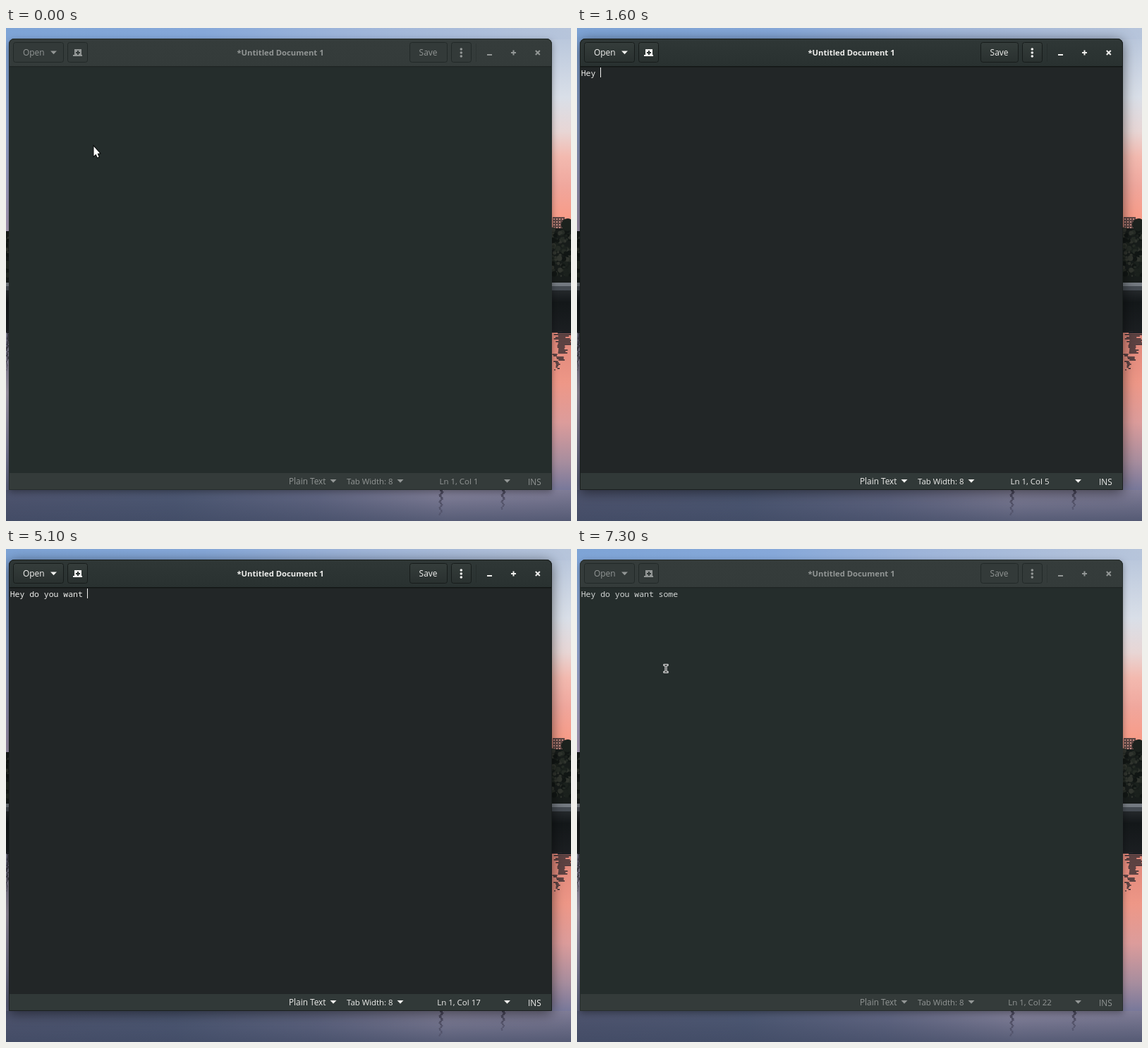
Animation of 801 by 699 pixels, one loop 8 s. Source, as an HTML page with a canvas:

```html
<!DOCTYPE html>
<html>
<head>
<meta charset="utf-8">
<style>
html, body { margin: 0; width: 100%; height: 100%; overflow: hidden; background: #222627; }
canvas { display: block; }
</style>
</head>
<body>
<canvas id="stage" width="801" height="699"></canvas>
<script>
const W = 801, H = 699, LOOP = 8000;
const ctx = document.getElementById('stage').getContext('2d');
const UI = '"Open Sans", "Noto Sans", sans-serif';
const MONO = '"Noto Sans Mono", "DejaVu Sans Mono", monospace';
const PHRASE = 'Hey do you want some ';
const KEY_TIMES = [1100, 1300, 1400, 1600, 1800, 2000, 2000, 2400, 2500, 2600, 2700,
  4200, 4600, 4700, 4900, 5100, 5300, 5500, 5600, 5800, 6000];
const CHAR = 6.87;

function mix(a, b, k) {
  const part = (hex, i) => parseInt(hex.substr(1 + 2 * i, 2), 16);
  return 'rgb(' + [0, 1, 2].map(i => Math.round(part(a, i) + (part(b, i) - part(a, i)) * k)) + ')';
}

function gradient(g, x0, y0, x1, y1, stops) {
  const fill = g.createLinearGradient(x0, y0, x1, y1);
  stops.forEach(([at, color]) => fill.addColorStop(at, color));
  return fill;
}

// Lake at dusk, visible only around the window
function paintWallpaper() {
  const canvas = document.createElement('canvas');
  canvas.width = W;
  canvas.height = H;
  const g = canvas.getContext('2d');
  let seed = 7;
  const rnd = () => (seed = seed * 16807 % 2147483647) / 2147483647;
  const rect = (color, x, y, w, h) => { g.fillStyle = color; g.fillRect(x, y, w, h); };

  rect(gradient(g, 0, 0, 0, H, [[0, '#7fa5d8'], [.2, '#94a9d6'], [.4, '#a99cb8'], [.53, '#c2c4cc'],
    [.64, '#77758a'], [.74, '#a29aac'], [.86, '#787995'], [1, '#414b66']]), 0, 0, 400, H);
  rect(gradient(g, 0, 0, 0, H, [[0, '#b4c3da'], [.14, '#d9dfe8'], [.21, '#e8d6d5'], [.26, '#f3bab0'],
    [.32, '#f0a79d'], [.38, '#f79c89'], [.62, '#dd8578'], [.72, '#ee9787'], [.8, '#dc9c9b'],
    [.88, '#a78d9e'], [.94, '#75779a'], [1, '#5b6684']]), 770, 0, 31, H);
  rect(gradient(g, 0, 0, W, 0, [[0, '#7ea4d6'], [.35, '#86a8d9'], [.6, '#9db4d9'], [1, '#b7c5db']]), 0, 0, W, 16);
  rect(gradient(g, 0, 0, W, 0, [[0, '#4e546e'], [.3, '#4d5873'], [.55, '#626783'],
    [.78, '#85829b'], [1, '#7f7c96']]), 0, 655, W, 44);
  rect(gradient(g, 0, 655, 0, H, [[0, 'rgba(62,72,98,0)'], [1, 'rgba(62,72,98,.65)']]), 0, 655, W, 44);

  rect('#5e4644', 775, 268, 17, 20);
  for (let y = 270; y < 286; y += 4)
    for (let x = 776; x < 791; x += 4) rect('#c08a80', x, y, 2, 2);
  for (const [x, w, top] of [[0, 5, 288], [774, 27, 284]]) {
    rect('#171c1a', x, top, w, 362 - top);
    for (let i = 0; i < w * 4; i++) {
      g.fillStyle = ['#1b211d', '#252b25', '#111614', '#30342e'][i % 4];
      g.beginPath();
      g.arc(x + rnd() * w, top + 2 + rnd() * 66, 1 + rnd() * 3, 0, 7);
      g.fill();
    }
    rect('#737980', x, 361, w, 5);
    rect('#454b52', x, 366, w, 6);
    rect(gradient(g, 0, 372, 0, 440, [[0, '#24282b'], [.25, '#131719'], [1, '#1d2023']]), x, 372, w, 60);
    for (let y = 430; y < 486; y += 2)
      rect('#24242a', x + rnd() * w * .4, y, w * (1 - (y - 430) / 60) * (.4 + rnd() * .7), 1.4);
  }
  g.fillStyle = '#1b211d';
  g.beginPath();
  g.arc(796, 279, 9, 0, 7);
  g.fill();

  for (const [x, h] of [[617, 35], [705, 28]])
    for (let y = 0; y < h; y += 2)
      rect('rgba(48,46,64,' + (.7 - y / h * .45) + ')', x - 2 + Math.sin(y * .7) * 1.5, 655 + y, 4 - y / h * 2, 2);
  return canvas;
}
const wallpaper = paintWallpaper();

function label(str, x, y, color, size = 11.8, align = 'left', weight = 400) {
  ctx.font = `${weight} ${size}px ${UI}`;
  ctx.textAlign = align;
  ctx.fillStyle = color;
  ctx.fillText(str, x, y);
}

function polygon(points) {
  ctx.beginPath();
  points.forEach(([x, y]) => ctx.lineTo(x, y));
  ctx.closePath();
}

function arrowDown(x, y, color) {
  polygon([[x - 4.5, y], [x + 4.5, y], [x, y + 4.7]]);
  ctx.fillStyle = color;
  ctx.fill();
}

function button(x, w, k) {
  ctx.beginPath();
  ctx.roundRect(x + .5, 20.5, w - 1, 28, 3);
  ctx.fillStyle = gradient(ctx, 0, 20, 0, 49,
    [[0, mix('#333a39', '#353d3b', k)], [1, mix('#333a39', '#29302f', k)]]);
  ctx.fill();
  ctx.strokeStyle = mix('#222928', '#171c1b', k);
  ctx.stroke();
}

function drawWindow(focus, lit) {
  const outline = () => { ctx.beginPath(); ctx.roundRect(4, 15, 770, 640, [8, 8, 0, 0]); };
  ctx.save();
  ctx.shadowColor = `rgba(0,0,0,${.35 + .2 * focus})`;
  ctx.shadowBlur = 10 + 8 * focus;
  ctx.shadowOffsetY = 3;
  ctx.fillStyle = mix('#252d2c', '#222627', focus);
  outline();
  ctx.fill();
  ctx.restore();

  ctx.save();
  outline();
  ctx.clip();
  ctx.fillStyle = gradient(ctx, 0, 15, 0, 55,
    [[0, mix('#353c3b', '#2f3736', focus)], [1, mix('#343b3a', '#293130', focus)]]);
  ctx.fillRect(4, 15, 770, 40);
  ctx.fillStyle = mix('#3a4140', '#3b4443', focus);
  ctx.fillRect(4, 15, 770, 1);
  ctx.fillStyle = mix('#202625', '#131716', focus);
  ctx.fillRect(4, 54, 770, 1.5);
  ctx.fillStyle = mix('#343b3a', '#313938', focus);
  ctx.fillRect(4, 631, 770, 24);
  ctx.restore();
  ctx.lineWidth = 1;
  ctx.strokeStyle = mix('#262d2c', '#1a1f1e', focus);
  ctx.beginPath();
  ctx.roundRect(4.5, 15.5, 769, 639, [7.5, 7.5, 0, 0]);
  ctx.stroke();

  const ink = mix('#929695', '#eeeeec', focus);
  const buttonInk = mix('#929695', '#f2f2f0', lit);
  [[10, 72], [87, 29], [572, 54], [631, 29]].forEach(([x, w]) => button(x, w, lit));
  label('Open', 24, 39, buttonInk, 11.9);
  arrowDown(67.5, 32.5, buttonInk);
  label('Save', 598.5, 39, buttonInk, 11.9, 'center');
  ctx.fillStyle = buttonInk;
  ctx.fillRect(97, 30, 10, 9);
  ctx.fillRect(95, 38, 13, 2);
  ctx.fillStyle = mix('#333a39', '#2d3433', lit);
  ctx.fillRect(101, 32, 2, 6);
  ctx.fillRect(99, 34, 6, 2);
  ctx.fillStyle = buttonInk;
  for (const y of [30, 35, 40]) {
    ctx.beginPath();
    ctx.arc(645.3, y, 1.8, 0, 7);
    ctx.fill();
  }

  label('*Untitled Document 1', 389, 39, ink, 11.25, 'center', 700);
  ctx.fillStyle = mix('#2d3433', '#262d2c', focus);
  ctx.fillRect(666, 22, 1, 26);
  ctx.fillStyle = ink;
  ctx.fillRect(682, 37, 7, 2);
  ctx.fillRect(716, 34, 7, 2);
  ctx.fillRect(718.5, 31.5, 2, 7);
  ctx.strokeStyle = ink;
  ctx.lineWidth = 2;
  ctx.beginPath();
  ctx.moveTo(750.8, 32);
  ctx.lineTo(756.8, 38);
  ctx.moveTo(756.8, 32);
  ctx.lineTo(750.8, 38);
  ctx.stroke();
  return ink;
}

function drawStatus(column, ink) {
  label('Plain Text', 401, 647, ink);
  label('Tab Width: 8', 483, 647, ink, 11.4);
  label('Ln 1, Col ' + column, 642, 647, ink, 11.5, 'center');
  label('INS', 740, 648, ink);
  [464, 559, 710.5].forEach(x => arrowDown(x, 640, ink));
}

function drawText(count, focus) {
  ctx.font = `400 11.5px ${MONO}`;
  ctx.textAlign = 'left';
  ctx.fillStyle = mix('#d3d6d5', '#eeeeec', focus);
  for (let i = 0; i < count; i++) ctx.fillText(PHRASE[i], 5.7 + i * CHAR, 67.5);
}

function drawArrow() {
  polygon([[124.5, 168], [124.5, 181.5], [127.5, 178.8], [129.6, 183.6],
    [131.6, 182.7], [129.6, 178], [133, 177.6]]);
  ctx.lineWidth = 2;
  ctx.strokeStyle = '#0a0c0c';
  ctx.stroke();
  ctx.fillStyle = '#fff';
  ctx.fill();
}

function drawBeam() {
  for (const [color, pad] of [['#fff', 1], ['#0c0e0e', 0]]) {
    ctx.fillStyle = color;
    for (const [x, y, w, h] of [[123.5, 164, 5, 1], [125.5, 164, 1, 11], [123.5, 174, 5, 1]])
      ctx.fillRect(x - pad, y - pad, w + 2 * pad, h + 2 * pad);
  }
}

const step = (t, start, values) => values[Math.min(values.length - 1, Math.floor((t - start) / 100))];

function render(t) {
  const leaving = t >= 7000;
  const fadeOut = leaving ? step(t, 7000, [.55, .2, .06, 0]) : 1;
  const focus = leaving ? fadeOut : t < 400 ? 0 : step(t, 400, [.5, 1]);
  const lit = leaving ? fadeOut : t < 500 ? 0 : step(t, 500, [.04, .4, .72, .92, 1]);
  const count = KEY_TIMES.filter(k => k <= t).length;

  ctx.drawImage(wallpaper, 0, 0);
  const ink = drawWindow(focus, lit);
  drawStatus(count + 1, ink);
  drawText(count, focus);
  if (t >= 400 && !leaving) {
    ctx.fillStyle = '#f4f4f2';
    ctx.fillRect(Math.floor(6 + count * CHAR), 56, 1, 14);
  }
  if (t < 400) drawArrow();
  else if (t < 1100 || leaving) drawBeam();
}

function tick() {
  render(performance.now() % LOOP);
  requestAnimationFrame(tick);
}
tick();
</script>
</body>
</html>
```
